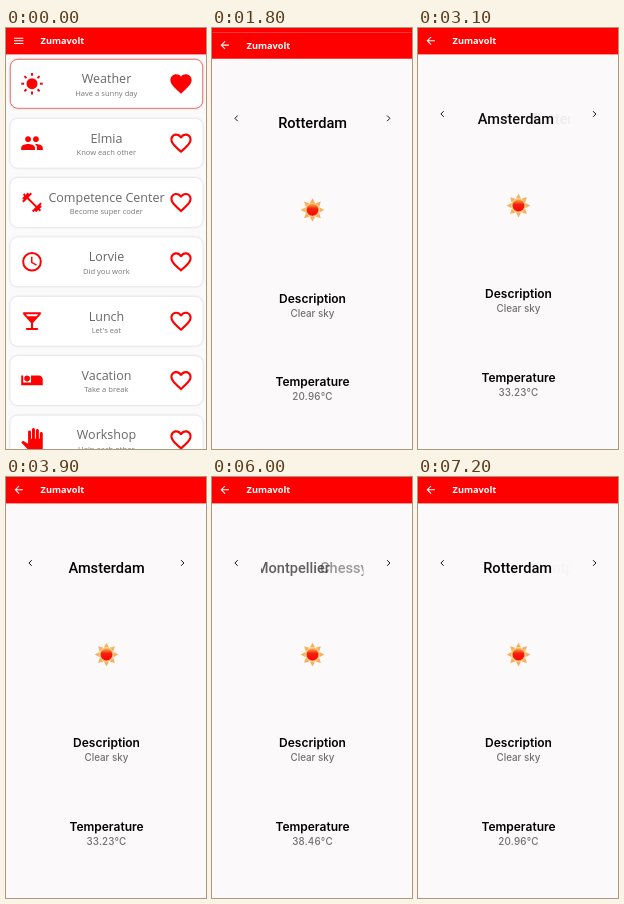
These frames come from a looping animation (200x421 px, 7.3 s). An HTML page:

```html
<!DOCTYPE html>
<html lang="en">
<head>
<meta charset="utf-8">
<title>Office app</title>
<style>
  html, body { margin: 0; width: 100%; height: 100%; overflow: hidden; background: #fafafa; }
  svg { display: block; }
  text { font-family: "Open Sans", sans-serif; text-anchor: middle; }
  .brand { font-size: 9.2px; font-weight: 700; fill: #fff; text-anchor: start; }
  .title { font-size: 12.5px; fill: #686868; }
  .note { font-size: 7.6px; fill: #777; }
  .city { font: 500 14.6px Roboto, sans-serif; fill: #000; }
  .label { font: 600 12px Inter, sans-serif; fill: #000; }
  .value { font: 500 9.8px Inter, sans-serif; fill: #707070; }
  .card { fill: #fff; filter: drop-shadow(0 .7px .8px #0003); }
</style>
</head>
<body>
<svg width="200" height="421" viewBox="0 0 200 421">
  <defs>
    <linearGradient id="core" x2="0" y2="1">
      <stop offset=".05" stop-color="#f79a35"/>
      <stop offset=".4" stop-color="#f5200f"/>
      <stop offset="1" stop-color="#f80606"/>
    </linearGradient>
    <clipPath id="window"><rect x="49" y="70" width="102.5" height="40"/></clipPath>
  </defs>
  <g id="menu"></g>
  <g id="detail">
    <rect width="200" height="421" fill="#fbf9fa"/>
    <g id="bar"></g>
    <path d="M25.7 83.2l-2.8 2.8 2.8 2.8M175.1 83.2l2.8 2.8-2.8 2.8" fill="none" stroke="#111"/>
    <g clip-path="url(#window)">
      <text id="leaving" class="city" y="95.7"></text>
      <text id="entering" class="city" y="95.7"></text>
    </g>
    <g id="sun" transform="translate(100.5 177.6)"></g>
    <text class="label" x="100.5" y="270.3">Description</text>
    <text class="value" x="100.5" y="284.3">Clear sky</text>
    <text class="label" x="100.5" y="353.9">Temperature</text>
    <text id="degrees" class="value" x="100.5" y="367.8" letter-spacing=".2"></text>
  </g>
</svg>
<script>
const $ = id => document.getElementById(id);
const LOOP = 7300, OPEN = 1512, OPEN_TIME = 866, SLIDE_TIME = 400;
const RED = '#f00';

const HEART = 'M16.5 3c-1.74 0-3.41.81-4.5 2.09C10.91 3.81 9.24 3 7.5 3 4.42 3 2 5.42 2 8.5c0 3.78 3.4 6.86 8.55 11.54L12 21.35l1.45-1.32C18.6 15.36 22 12.28 22 8.5 22 5.42 19.58 3 16.5 3z';
const HOLE = 'm-4.4 15.55l-.1.1-.1-.1C7.14 14.24 4 11.39 4 8.5 4 6.5 5.5 5 7.5 5c1.54 0 3.04.99 3.57 2.36h1.87C13.46 5.99 14.96 5 16.5 5c2 0 3.5 1.5 3.5 3.5 0 2.89-3.14 5.74-7.9 10.05z';
const disc = r => `M${12 - r} 12a${r} ${r} 0 1 0 ${2 * r} 0a${r} ${r} 0 1 0 ${-2 * r} 0z`;
const MENU = 'M3 18h18v-2H3zm0-5h18v-2H3zm0-7v2h18V6z';
const BACK = 'M20 11H7.83l5.59-5.59L12 4l-8 8 8 8 1.41-1.41L7.83 13H20z';

// Eight copies of one ray around a centre
const rays = (d, fill, x = 0, y = 0) => [...Array(8).keys()]
  .map(i => `<path d="${d}" fill="${fill}" transform="rotate(${i * 45} ${x} ${y})"/>`).join('');
const path = d => `<path fill-rule="evenodd" d="${d}"/>`;
const icon = (body, x, y, scale, fill = RED) =>
  `<g fill="${fill}" transform="translate(${x} ${y}) scale(${scale}) translate(-12 -12)">${body}</g>`;
const header = d => `<rect width="200" height="26.4" fill="${RED}"/>` +
  icon(path(d), 12.7, 12.8, .52, '#fff') + '<text class="brand" x="34.6" y="16.3">Zumavolt</text>';

const rows = [
  ['Weather', 'Have a sunny day', path(disc(5.6)) + rays('M11 1h2v3h-2z', RED, 12, 12)],
  ['Elmia', 'Know each other', path('M16 11c1.66 0 2.99-1.34 2.99-3S17.66 5 16 5c-1.66 0-3 1.34-3 3s1.34 3 3 3zm-8 0c1.66 0 2.99-1.34 2.99-3S9.66 5 8 5C6.34 5 5 6.34 5 8s1.34 3 3 3zm0 2c-2.33 0-7 1.17-7 3.5V19h14v-2.5c0-2.33-4.67-3.5-7-3.5zm8 0c-.29 0-.62.02-.97.05 1.16.84 1.97 1.97 1.97 3.45V19h6v-2.5c0-2.33-4.67-3.5-7-3.5z')],
  ['Competence Center', 'Become super coder', path('M20.57 14.86L22 13.43 20.57 12 17 15.57 8.43 7 12 3.43 10.57 2 9.14 3.43 7.71 2 5.57 4.14 4.14 2.71 2.71 4.14l1.43 1.43L2 7.71l1.43 1.43L2 10.57 3.43 12 7 8.43 15.57 17 12 20.57 13.43 22l1.43-1.43L16.29 22l2.14-2.14 1.43 1.43 1.43-1.43-1.43-1.43L22 16.29z')],
  ['Lorvie', 'Did you work', path(disc(10) + disc(8) + 'M12.5 7H11v6l5.25 3.15.75-1.23-4.5-2.67z')],
  ['Lunch', "Let's eat", path('M21 5V3H3v2l8 9v5H6v2h12v-2h-5v-5zM7.43 7L5.66 5h12.69l-1.78 2z')],
  ['Vacation', 'Take a break', path('M7 13c1.65 0 3-1.35 3-3S8.65 7 7 7s-3 1.35-3 3 1.35 3 3 3zm12-6h-8v7H3V7H1v10h22v-6c0-2.21-1.79-4-4-4z')],
  ['Workshop', 'Help each other', path('M23 5.5V20c0 2.2-1.8 4-4 4h-7.3c-1.08 0-2.1-.43-2.85-1.19L1 14.83s1.26-1.23 1.3-1.25c.22-.19.49-.29.79-.29.22 0 .42.06.6.16L8 15.91V4c0-.83.67-1.5 1.5-1.5S11 3.17 11 4v7h1V1.5c0-.83.67-1.5 1.5-1.5S15 .67 15 1.5V11h1V2.5c0-.83.67-1.5 1.5-1.5s1.5.67 1.5 1.5V11h1V5.5c0-.83.67-1.5 1.5-1.5s1.5.67 1.5 1.5z')],
];

$('menu').innerHTML = header(MENU) + rows.map(([title, note, art], i) => `
  <g transform="translate(0 ${i * 59.35})">
    <rect class="card" x="4.3" y="31.3" width="192.4" height="49" rx="7.5"
      ${i ? '' : 'stroke="#f0504a" stroke-width=".8"'}/>
    ${icon(art, 26, 55.7, .98)}
    <text class="title" x="100.5" y="55.4">${title}</text>
    <text class="note" x="100.3" y="67.5">${note}</text>
    ${icon(path(HEART + (i ? HOLE : '')), 175, 55.8, 1.06)}
  </g>`).join('');
$('bar').innerHTML = header(BACK);
$('sun').innerHTML = rays('M-2.6 -7L0 -11.8 2.6 -7z', '#f5b060') +
  '<circle r="7.2" fill="#f8c070"/><circle r="5.9" fill="url(#core)"/>';

const visits = [
  [0, 'Rotterdam', '20.96°C'],
  [2760, 'Amsterdam', '33.23°C'],
  [4350, 'Chessy', '33.23°C'],
  [5772, 'Montpellier', '38.46°C'],
  [6836, 'Rotterdam', '20.96°C'],
];

function place(id, name, x, opacity) {
  const el = $(id);
  el.textContent = name;
  el.setAttribute('x', x);
  el.setAttribute('opacity', opacity);
}

function draw(now) {
  const t = now % LOOP;

  const opened = Math.min(1, Math.max(0, (t - OPEN) / OPEN_TIME));
  const fade = Math.min(1, Math.max(0, (t - OPEN) / 120));
  $('detail').setAttribute('transform', `translate(0 ${33 * (1 - opened) ** 5})`);
  $('detail').setAttribute('opacity', 1 - (1 - fade) ** 4);

  const index = visits.findLastIndex(([start]) => t >= start);
  const [start, city, degrees] = visits[index];
  const step = index ? Math.min(1, (t - start) / SLIDE_TIME) : 1;
  const eased = .5 - Math.cos(Math.PI * step) / 2;
  place('entering', city, 100.6 - 51 * (1 - eased), eased);
  place('leaving', index ? visits[index - 1][1] : '', 100.6 + 51 * eased, 1 - eased);
  $('degrees').textContent = degrees;
}

const begin = performance.now();
(function tick() {
  draw(performance.now() - begin);
  requestAnimationFrame(tick);
})();
</script>
</body>
</html>
```
